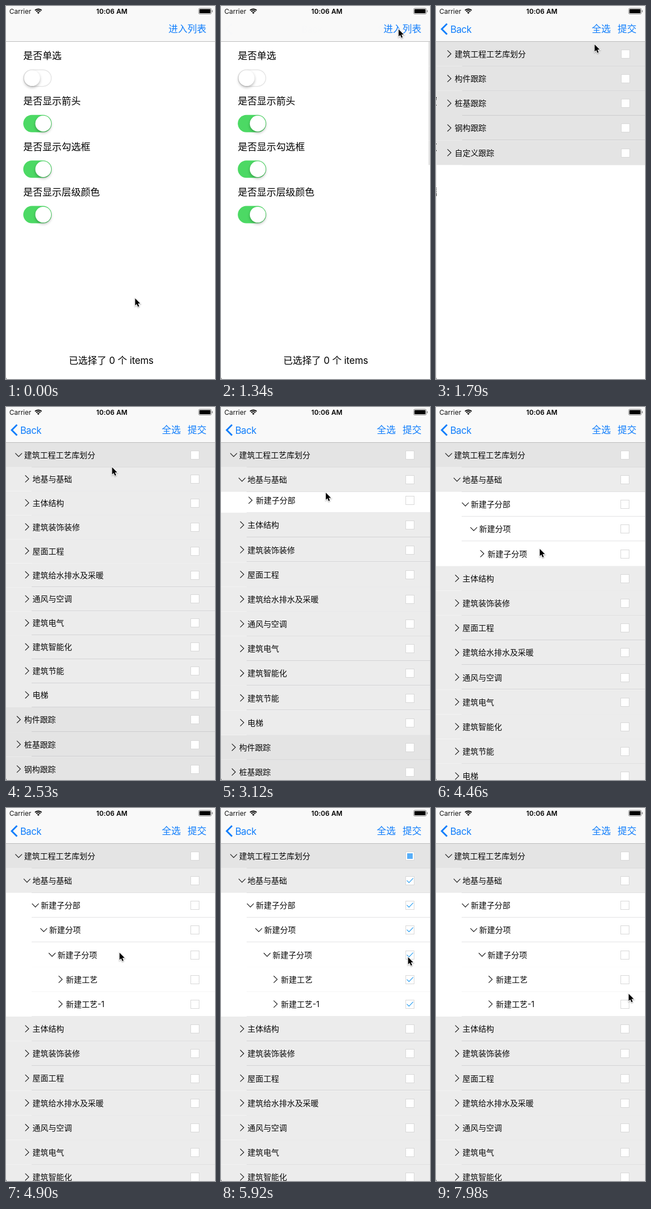
Animation of 375 by 667 pixels, one loop 8000 ms. Source, as an HTML page with a canvas:

```html
<!DOCTYPE html>
<html lang="zh-CN">
<head>
<meta charset="utf-8">
<title>Tree list</title>
<style>
html, body { margin: 0; width: 100%; height: 100%; overflow: hidden; background: #fff; }
canvas { display: block; width: 375px; height: 667px; }
</style>
</head>
<body>
<canvas id="stage"></canvas>
<script>
const W = 375, H = 667, LOOP = 8000;
const BAR = 63.45, ROW = 44.18;
const BLUE = '#117efc';
const FONT = 'Inter, "Noto Sans CJK SC", "Noto Sans CJK", sans-serif';

const canvas = document.getElementById('stage');
const dpr = window.devicePixelRatio || 1;
canvas.width = W * dpr;
canvas.height = H * dpr;
const ctx = canvas.getContext('2d');

// The screen refreshes on a coarse beat after a first rest.
const FIRST = 445, BEAT = 147.7;
const PUSH = 1324, EXPAND = 300;
const CHECK = 5905, UNCHECK_A = 6940, UNCHECK_B = 7825;

const leaf = (name, on = Infinity, off = Infinity) => ({ name, on, off, kids: [] });
const branch = (name, open, ...kids) => ({ name, open, kids });

const tree = [
  branch('建筑工程工艺库划分', 2243,
    branch('地基与基础', 2880,
      branch('新建子分部', 3436,
        branch('新建分项', 4060,
          branch('新建子分项', 4580,
            leaf('新建工艺', CHECK, UNCHECK_A),
            leaf('新建工艺-1', CHECK, UNCHECK_B))))),
    ...['主体结构', '建筑装饰装修', '屋面工程', '建筑给水排水及采暖', '通风与空调',
      '建筑电气', '建筑智能化', '建筑节能', '电梯'].map(n => leaf(n))),
  ...['构件跟踪', '桩基跟踪', '钢构跟踪', '自定义跟踪'].map(n => leaf(n))
];

// Pointer path: time, x, y
const path = [
  [0, 231, 522], [300, 231, 522], [445, 236, 492], [1180, 318, 41], [1340, 318, 41],
  [1774, 284, 68], [2100, 196, 84], [2300, 190, 88], [2513, 189.7, 107], [2660, 189, 125],
  [2900, 188, 128], [3250, 187, 170], [3546, 187, 173], [3694, 185.3, 201],
  [3990, 185, 214], [4137, 185, 215], [4433, 185.5, 253], [4580, 186, 256],
  [4876, 203, 258], [5030, 203, 258], [5762, 335, 266], [6210, 335, 266],
  [6649, 341, 309], [6944, 341, 309], [7534, 343.5, 351], [7830, 343.5, 351],
  [7977, 345, 331.5], [8000, 345, 331.5]
];

const clamp = v => Math.min(1, Math.max(0, v));
const smooth = v => { v = clamp(v); return v * v * (3 - 2 * v); };

function text(str, x, mid, size, { color = '#000', weight = 400, align = 'left', gap = 0 } = {}) {
  ctx.font = `${weight} ${size}px ${FONT}`;
  ctx.letterSpacing = gap + 'px';
  ctx.textAlign = align;
  ctx.fillStyle = color;
  ctx.fillText(str, x, mid + size * 0.38);
}

function line(points, color, width) {
  ctx.beginPath();
  points.forEach(([x, y]) => ctx.lineTo(x, y));
  ctx.strokeStyle = color;
  ctx.lineWidth = width;
  ctx.stroke();
}

function rect(x, y, w, h, color) {
  ctx.fillStyle = color;
  ctx.fillRect(x, y, w, h);
}

function pill(x, y, w, h, r) {
  ctx.beginPath();
  ctx.roundRect(x, y, w, h, r);
}

function faded(alpha, draw) {
  ctx.save();
  ctx.globalAlpha = clamp(alpha);
  draw();
  ctx.restore();
}

function toggle(mid, on) {
  if (on) {
    pill(31, mid - 15.5, 51, 31, 15.5);
    ctx.fillStyle = '#4cd964';
    ctx.fill();
  } else {
    pill(31.75, mid - 14.75, 49.5, 29.5, 14.75);
    ctx.strokeStyle = '#e5e5e5';
    ctx.lineWidth = 1.5;
    ctx.stroke();
  }
  ctx.save();
  ctx.shadowColor = 'rgba(0,0,0,.28)';
  ctx.shadowBlur = 5 * dpr;
  ctx.shadowOffsetY = 2.5 * dpr;
  ctx.beginPath();
  ctx.arc(on ? 66.8 : 46.8, mid, 14.2, 0, 7);
  ctx.fillStyle = '#fff';
  ctx.fill();
  ctx.restore();
}

function drawHome() {
  rect(0, 0, W, H, '#fff');
  ['是否单选', '是否显示箭头', '是否显示勾选框', '是否显示层级颜色'].forEach((label, i) => {
    const y = 88.5 + i * 81.4;
    text(label, 31, y, 17.2);
    toggle(y + 40.4, i > 0);
  });
  text('已选择了 0 个 items', 188.7, 634, 17, { align: 'center', gap: -0.1 });
}

function pickState(node, t) {
  if (!node.kids.length) return t >= node.on && t < node.off ? 'all' : 'none';
  const states = node.kids.map(k => pickState(k, t));
  return states.every(s => s === states[0]) ? states[0] : 'some';
}

function checkbox(mid, state) {
  const y = Math.round(mid - 7.6);
  rect(331, y, 16, 16, '#d8d8d8');
  rect(332, y + 1, 14, 14, '#fff');
  if (state === 'some') rect(334, y + 3, 10, 10, '#58aef8');
  if (state === 'all') line([[333.4, y + 7.6], [337.3, y + 11.3], [344.8, y + 3.6]], '#2d9ff0', 1.2);
}

function drawRow(node, level, top, h, t) {
  const mid = top + h - 22.1;
  const cx = 22.7 + level * 15;
  const chevron = t >= node.open
    ? [[cx - 6, mid - 3], [cx, mid + 3.2], [cx + 6, mid - 3]]
    : [[cx - 3.2, mid - 6.2], [cx + 3.2, mid], [cx - 3.2, mid + 6.2]];
  ctx.save();
  ctx.beginPath();
  ctx.rect(0, top, W, h);
  ctx.clip();
  rect(0, top, W, h + 1, ['#e4e4e4', '#ececec'][level] || '#fff');
  line(chevron, '#1a1a1a', 1.15);
  text(node.name, 32.5 + level * 15, mid, 14.2, { color: '#0a0a0a' });
  checkbox(mid, pickState(node, t));
  rect(46, Math.round(top + h - 0.8), W - 46, 1, 'rgba(60,60,70,.14)');
  ctx.restore();
}

// Draws nodes from top down and returns the y below them.
function drawNodes(nodes, level, top, grow, t) {
  for (const node of nodes) {
    const h = ROW * grow;
    if (top < H) drawRow(node, level, top, h, t);
    top += h;
    if (t > node.open) {
      top = drawNodes(node.kids, level + 1, top, smooth((t - node.open) / EXPAND), t);
    }
  }
  return top;
}

function drawList(t) {
  rect(0, 0, W, H, '#fff');
  drawNodes(tree, 0, BAR, 1, t);
}

function drawStatus() {
  text('Carrier', 6, 9.4, 12, { color: '#111' });
  text('10:06 AM', 190, 9.4, 12, { weight: 600, align: 'center', gap: 0.1 });

  const up = -Math.PI / 2, spread = 0.76;
  for (const r of [8.6, 5.4]) {
    ctx.beginPath();
    ctx.arc(58, 14, r, up - spread, up + spread);
    ctx.strokeStyle = '#000';
    ctx.lineWidth = 2;
    ctx.stroke();
  }
  ctx.beginPath();
  ctx.moveTo(58, 14);
  ctx.arc(58, 14, 3.2, up - spread, up + spread);
  ctx.fillStyle = '#000';
  ctx.fill();

  pill(345.5, 4, 23, 10.5, 2.5);
  ctx.strokeStyle = '#8c8c8c';
  ctx.lineWidth = 1;
  ctx.stroke();
  pill(347, 5.5, 20, 7.5, 1);
  ctx.fill();
  pill(369.5, 7.3, 1.5, 4, 0.7);
  ctx.fillStyle = '#8c8c8c';
  ctx.fill();
}

function drawBar(left) {
  const shown = 1 - left;
  rect(0, 0, W, 63, '#f9f9f9');
  rect(0, 63, W, 1, '#bcbcbc');
  drawStatus();
  faded(1 - 2 * shown, () => text('进入列表', 291.6, 41, 17, { color: BLUE }));
  faded(shown, () => {
    line([[19.8, 31.8], [10.3, 41.3], [19.8, 50.8]], BLUE, 3);
    text('Back', 25.5 + left * 120, 41.2, 17, { color: BLUE, gap: -0.5 });
    text('全选', 279.6, 41, 17, { color: BLUE });
    text('提交', 325.8, 41, 17, { color: BLUE });
  });
}

function drawPointer(t) {
  const i = path.findIndex(p => p[0] > t);
  const [a, b] = [path[i - 1], path[i]];
  const k = (t - a[0]) / (b[0] - a[0]);
  ctx.save();
  ctx.translate(a[1] + (b[1] - a[1]) * k + 0.7, a[2] + (b[2] - a[2]) * k + 0.8);
  ctx.beginPath();
  [[0, 0], [0, 12.8], [2.9, 10.1], [5, 15], [7.2, 14.1], [5.1, 9.3], [9.2, 9.3]]
    .forEach(([x, y]) => ctx.lineTo(x, y));
  ctx.closePath();
  ctx.shadowColor = 'rgba(0,0,0,.35)';
  ctx.shadowBlur = 2 * dpr;
  ctx.shadowOffsetY = dpr;
  ctx.strokeStyle = '#fff';
  ctx.lineWidth = 2;
  ctx.stroke();
  ctx.shadowColor = 'transparent';
  ctx.fillStyle = '#000';
  ctx.fill();
  ctx.restore();
}

function draw(t) {
  const s = Math.max(0, t - PUSH) * 0.018;
  const left = t > 1900 ? 0 : (1 + s) * Math.exp(-s);
  ctx.setTransform(dpr, 0, 0, dpr, 0, 0);
  if (left > 0) {
    ctx.save();
    ctx.translate(-112.5 * (1 - left), 0);
    drawHome();
    ctx.restore();
    rect(0, 0, W, H, `rgba(0,0,0,${0.1 * (1 - left)})`);
  }
  if (left < 1) {
    ctx.save();
    ctx.translate(W * left, 0);
    drawList(t);
    ctx.restore();
  }
  drawBar(left);
  rect(0, 665, 1, 2, '#777');
  drawPointer(t);
}

function tick() {
  const t = performance.now() % LOOP;
  const beat = Math.floor((t - FIRST) / BEAT);
  draw(t < FIRST ? 0 : FIRST + beat * BEAT);
  requestAnimationFrame(tick);
}
tick();
</script>
</body>
</html>
```
